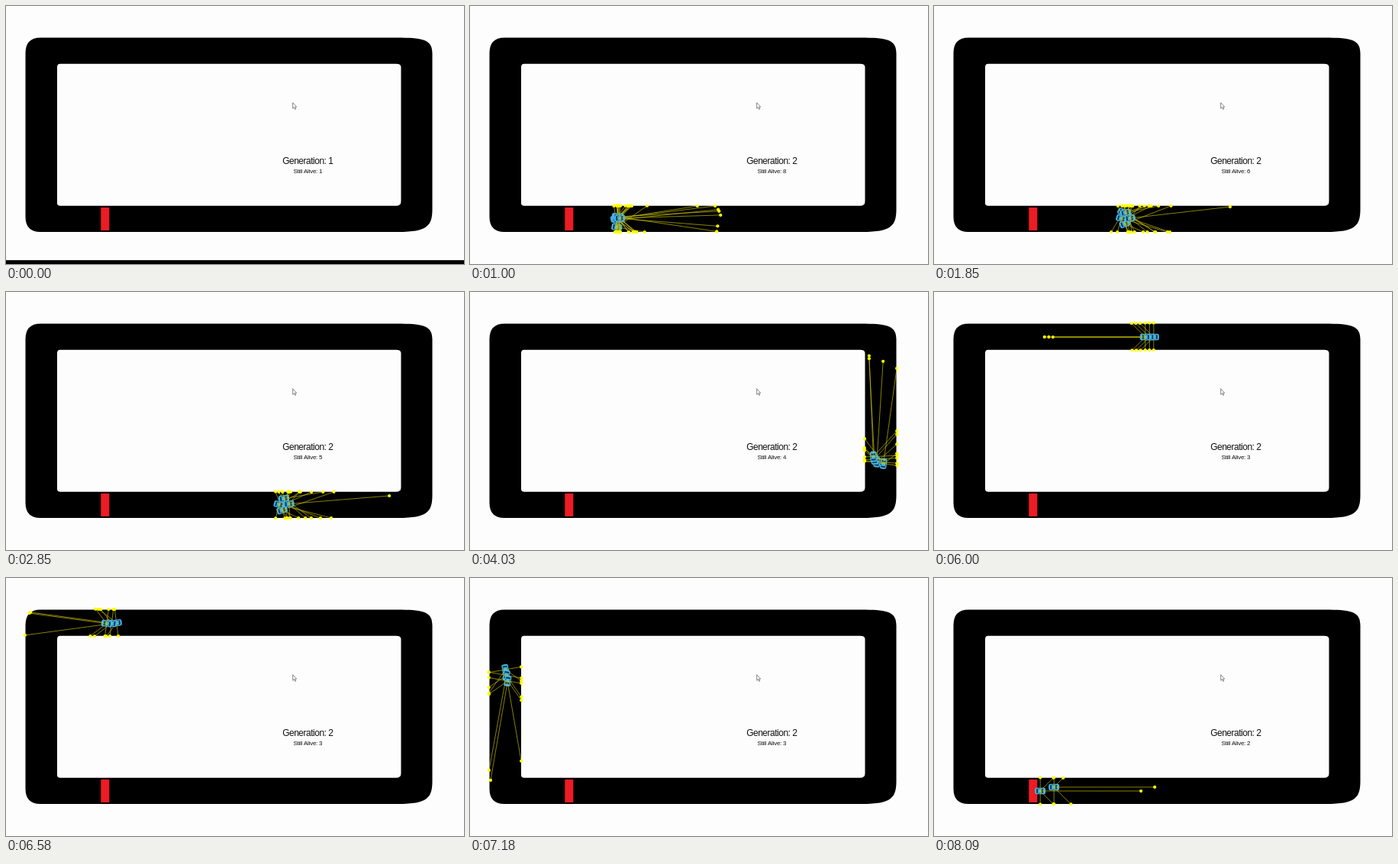
An HTML page with a canvas for the animation above (8120 ms loop, 600 by 338 pixels).

```html
<!DOCTYPE html>
<html lang="en">
<head>
<meta charset="utf-8">
<title>Driving cars</title>
<style>
html, body { margin: 0; width: 100%; height: 100%; overflow: hidden; background: #fefdfe; }
canvas { display: block; }
svg { position: absolute; }
</style>
</head>
<body>
<svg width="0" height="0"><path id="lane" fill="none" d="M130 278H507A25 25 0 0 0 532 253V84A25 25 0 0 0 507 59H72A25 25 0 0 0 47 84V253A25 25 0 0 0 72 278H300"/></svg>
<canvas id="stage" width="600" height="338"></canvas>
<script>
const LOOP = 8120, START = 30, RANGE = 132;
const ctx = document.getElementById('stage').getContext('2d');
const lane = document.getElementById('lane');
const rad = deg => deg * Math.PI / 180;

const track = new Path2D(
  'M45 41.5H518C548 42 558.5 45 558.5 62V266C558.5 288 552 296 514 296H45' +
  'Q25.5 296 25.5 276V62Q25.5 41.5 45 41.5Z' +
  'M71 75.7H511Q517.5 75.7 517.5 80V256Q517.5 261.8 511 261.8H71Q67 261.8 67 258V80Q67 75.7 71 75.7Z');
const cursor = new Path2D('M375.7 126.7V134.2L377.4 132.7L378.6 135.4L379.8 134.9L378.6 132.2H380.7Z');

// Road mask used by the distance sensors
const maskCtx = new OffscreenCanvas(600, 338).getContext('2d');
maskCtx.fill(track, 'evenodd');
const mask = maskCtx.getImageData(0, 0, 600, 338).data;
const onRoad = (x, y) => mask[(Math.floor(y) * 600 + Math.floor(x)) * 4 + 3] > 127;

// Distance driven by the pack: it speeds up as fewer cars remain
const travel = [[START, 0], [1850, 121], [2850, 234], [4030, 450], [6000, 849], [7180, 1142], [8090, 1383]];
function driven(t) {
  const i = Math.max(1, travel.findIndex(([time]) => time >= t));
  const [t0, a] = travel[t > 8090 ? travel.length - 2 : i - 1];
  const [t1, b] = travel[t > 8090 ? travel.length - 1 : i];
  return a + (b - a) * (t - t0) / (t1 - t0);
}

// Time each car drops out; later cars in the list steer more wildly
const ends = [LOOP, 7700, LOOP, 4250, 3400, 2400, 1500, 1100, 700, 400];

function pose(i, t) {
  const turn = i % 3 < 2 ? 1 : -1;
  const scatter = Math.exp(-(((t - 2350) / 1100) ** 2));
  const swing = Math.PI * (t - 6000) / 2090;
  const veer = turn * Math.max(0, 1 - (ends[i] - t) / 600) ** 2 * (ends[i] < LOOP);

  const s = Math.max(0, driven(t) * (1.0065 - .0065 * i) + 6 * Math.cos(1.6 * i) * scatter);
  const out = -9 * Math.sin(1.6 * i) * scatter + 14 * veer +
    (2.5 * i - 4) * (1 - scatter) * (1 - Math.cos(swing)) / 2 * (t > 2350);
  const steer = turn * (10 * Math.sin(swing) * (1 - scatter) * (t > 2350) - (8 + 6 * i) * scatter) + 30 * veer;

  const p = lane.getPointAtLength(s), q = lane.getPointAtLength(s + 1);
  const a = Math.atan2(q.y - p.y, q.x - p.x);
  return [p.x - Math.sin(a) * out, p.y + Math.cos(a) * out, a + rad(steer)];
}

function drawCar(x, y, a) {
  const box = (color, ...r) => {
    ctx.fillStyle = color;
    ctx.beginPath();
    ctx.roundRect(...r);
    ctx.fill();
  };
  ctx.save();
  ctx.translate(x, y);
  ctx.rotate(a);
  box('#45b4e6', -7, -4.3, 14, 8.6, 2.4);
  box('#10384c', -5, -3.1, 2, 6.2, .8);
  box('#10384c', 1.4, -3.3, 2.6, 6.6, 1);
  for (const side of [-3.5, 2.5]) box('#1c5d7c', -2.6, side, 3.6, 1, .3);
  ctx.restore();
}

function drawSensors(x, y, a) {
  ctx.strokeStyle = '#d2c800';
  ctx.lineWidth = .65;
  ctx.fillStyle = '#ff0';
  for (let d = -90; d <= 90; d += 45) {
    const c = Math.cos(a + rad(d)), n = Math.sin(a + rad(d));
    let len = 0;
    while (len < RANGE && onRoad(x + c * len, y + n * len)) len += .5;
    const ex = x + c * len, ey = y + n * len;
    ctx.beginPath();
    ctx.moveTo(x, y);
    ctx.lineTo(ex, ey);
    ctx.stroke();
    ctx.beginPath();
    ctx.arc(ex, ey, 2.1, 0, 7);
    ctx.fill();
  }
}

function label(text, size, spacing, y) {
  ctx.font = size + 'px "Liberation Sans", Arial, sans-serif';
  ctx.letterSpacing = spacing + 'px';
  ctx.textAlign = 'center';
  ctx.fillStyle = '#111';
  ctx.fillText(text, 395.3, y);
}

function draw(t) {
  const running = t >= START;
  const alive = running ? [...ends.keys()].filter(i => t < ends[i]) : [];
  ctx.fillStyle = '#fefdfe';
  ctx.fillRect(0, 0, 600, 338);
  ctx.fillStyle = '#000';
  ctx.fill(track, 'evenodd');
  if (!running) ctx.fillRect(0, 333, 600, 5);
  ctx.fillStyle = '#ed1c24';
  ctx.fillRect(124.3, 264, 11, 30);

  for (const i of alive.reverse()) {
    const place = pose(i, t);
    drawCar(...place);
    drawSensors(...place);
  }

  label('Generation: ' + (running ? 2 : 1), 12, -.5, 207.3);
  label('Still Alive: ' + (running ? alive.length : 1), 8, -.25, 219);
  ctx.fillStyle = '#fff';
  ctx.fill(cursor);
  ctx.strokeStyle = '#555';
  ctx.lineWidth = .7;
  ctx.stroke(cursor);
}

const begin = performance.now();
function tick() {
  draw((performance.now() - begin) % LOOP);
  requestAnimationFrame(tick);
}
tick();
</script>
</body>
</html>
```
